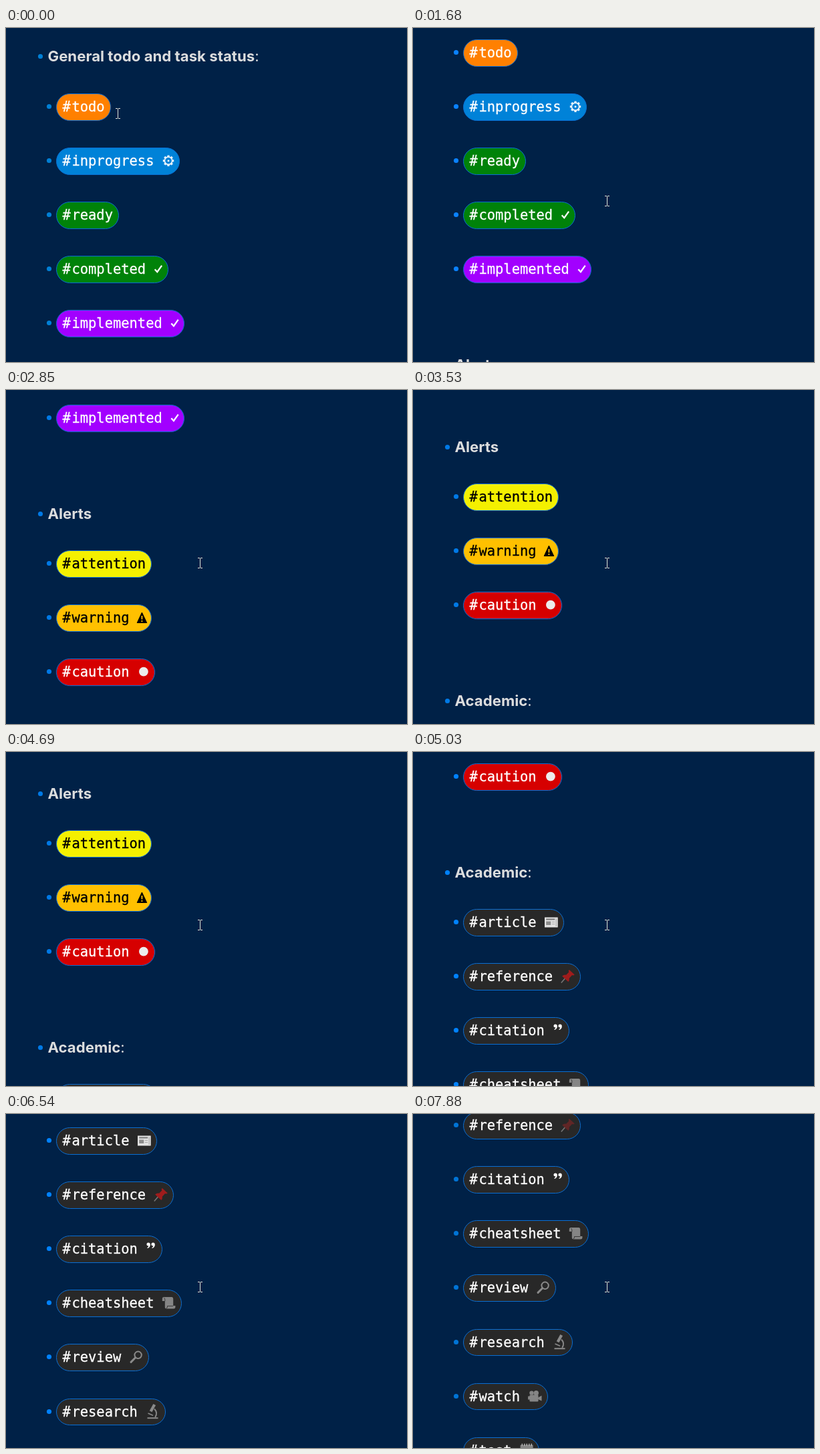
An HTML page that plays this animation: 600 by 500 pixels, repeating every 8 s.

```html
<!DOCTYPE html>
<html lang="en">
<head>
<meta charset="utf-8">
<title>Tag styles</title>
<style>
  html, body { margin: 0; width: 100%; height: 100%; overflow: hidden; background: #002147; }
  svg { display: block; width: 600px; height: 500px; }
  .head { font: 700 22.2px Inter, sans-serif; fill: #dcddde; }
  .head tspan { font-weight: 400; }
  .tag { font: 20.43px "DejaVu Sans Mono", monospace; stroke-width: .3px; }
</style>
</head>
<body>
<svg viewBox="0 0 600 500">
  <g id="page"></g>
  <path id="caret" d="M0 .5H3M4 .5H7M3.5 1V15M0 15.5H3M4 15.5H7" fill="none" stroke="#e6e2d6"/>
</svg>
<script>
const LOOP = 8000, CHAR = 12.3, LEFT = 85, PITCH = 81.1, PILL = 40.6;
const page = document.getElementById('page');
const caret = document.getElementById('caret');

const teeth = Array.from({ length: 8 }, (_, i) =>
  `<path d="M-1.5 -8.2H1.5L2 -5H-2Z" transform="rotate(${i * 45})"/>`).join('');

// Each icon: advance width and artwork, drawn from its left edge and the row's centre line.
const icons = {
  gear: [17, `<g transform="translate(10.4 -.3)" fill="#e8f2fa">${teeth}
    <circle r="5.6" fill="none" stroke="#e8f2fa" stroke-width="1.7"/><circle r="1.5"/></g>`],
  check: [12.3, `<path d="M2.4 .3L6 4.2L12.8 -5.4" fill="none" stroke="#fff" stroke-width="2.3"/>`],
  warn: [12.3, `<path d="M7.7 -8L15 7.5H.5Z" stroke="#000" stroke-linejoin="round"/>
    <path d="M7.7 -3V2.5M7.7 4V6" stroke="#ffc000" stroke-width="1.8"/>`],
  dot: [17, `<circle cx="10.2" cy="-.3" r="6.9" fill="#ececec"/>`],
  news: [20.5, `<path d="M1.3 -7.5H21V7.5H1.3Z" fill="#e2e2e2"/>
    <path d="M18.5 -5.5V6" stroke="#a0a0a0"/><path d="M3.5 -4.5H16.5" stroke="#777" stroke-width="2"/>
    <path d="M3.5 -1.5H10.5V4H3.5Z" fill="#8b8b8b"/>
    <path d="M12 -.5H16.5M12 2.5H16.5" stroke="#aaa"/>`],
  pin: [20.5, `<path d="M8 2L1.5 9.5" stroke="#777" stroke-width="1.6"/>
    <path id="pin" d="M13.5 -10L21.5 -2.5L19.5 -1.5L17.8 -2L13.6 2.4Q14 5.6 12 8L2.8 -.6Q5.5 -2.8 8.8 -2.3L13 -6.6L12.3 -8.4Z"/>`],
  quote: [15.6, [2.4, 9.4].map(x => `<path transform="translate(${x} -9.5)" fill="#fff"
    d="M2.4 0Q5.4 0 5.4 3.2Q5.4 7.2 1.4 8.6L.8 7.5Q2.8 6.5 3 5Q0 5 0 2.5Q0 0 2.4 0Z"/>`).join('')],
  scroll: [20.5, `<path d="M3.2 -9H15.2Q17.6 -9 17.6 -6V4H20.8V6Q20.8 8.5 18 8.5H8Q5.2 8.5 5.2 6V-3H1.2V-6.5Q1.2 -9 3.2 -9Z" fill="#858585"/>
    <path d="M4 -8Q5.4 -7 5.4 -3M8.5 4.5H17.6M9 4.5Q9 8 7 8" fill="none" stroke="#3c3c3c"/>`],
  lens: [20.5, `<g fill="none" stroke="#8a8a8a"><circle cx="14.2" cy="-3.2" r="5.2" stroke-width="2"/>
    <path d="M10.2 .8L3.6 7.4" stroke-width="3" stroke-linecap="round"/></g>`],
  scope: [20.5, `<g fill="none" stroke="#8a8a8a"><path d="M14.2 -11L8.6 -.8" stroke-width="4.2"/>
    <path d="M14 -4.5Q19.5 1 15.2 8" stroke-width="1.9"/>
    <path d="M3.5 9.2H19.5" stroke-width="2"/><path d="M4.5 2L12 5.2" stroke-width="1.6"/></g>`],
  camera: [20.5, `<g fill="#858585"><circle cx="6.4" cy="-5.4" r="3.2"/><circle cx="13.2" cy="-5.2" r="3.7"/>
    <rect x="3.4" y="-2.5" width="13" height="10" rx="1.2"/>
    <path d="M16 1.5L21.4 -1.5V6.5L16 4Z"/><path d="M1 -.5H4V4.5H1Z"/></g>`],
  diary: [20.5, `<rect x="1.8" y="-8.5" width="19" height="17" fill="#858585"/>
    <path d="M4.5 -10.5V-7M8 -10.5V-7M11.5 -10.5V-7M15 -10.5V-7M18.5 -10.5V-7" stroke="#b8b8b8" stroke-width="1.4"/>
    <path d="M3.5 -3H19M3.5 1H19M3.5 5H19" stroke="#444"/>`]
};

const GREEN = '#008209', DARK = '#282828';
const sections = [
  { y: 42, top: 98, title: 'General todo and task status', colon: ':', tags: [
    ['todo', '#ff8000'], ['inprogress', '#0082d8', 'gear'], ['ready', GREEN],
    ['completed', GREEN, 'check'], ['implemented', '#a200ff', 'check']] },
  { y: 585, top: 640, title: 'Alerts', colon: '', tags: [
    ['attention', '#f4f000', '', '#000'], ['warning', '#ffc000', 'warn', '#000'],
    ['caution', '#d60000', 'dot']] },
  { y: 965, top: 1020, title: 'Academic', colon: ':', tags: [
    ['article', DARK, 'news'], ['reference', DARK, 'pin'], ['citation', DARK, 'quote'],
    ['cheatsheet', DARK, 'scroll'], ['review', DARK, 'lens'], ['research', DARK, 'scope'],
    ['watch', DARK, 'camera'], ['test', DARK, 'diary']] }
];

const bullet = (x, y) => `<circle cx="${x}" cy="${y}" r="3.55" fill="currentColor"/>`;

// Pill edges snap to whole pixels.
function tag([name, fill, icon, ink = '#fff'], start) {
  const top = Math.round(start), bottom = Math.round(start + PILL), mid = top + 20;
  const end = (name.length + 2) * CHAR;
  const [advance, art] = icons[icon] || [-CHAR, ''];
  const width = Math.floor(20.5 + end + advance + 1e-6);
  return bullet(64.5, mid - .5) +
    `<rect x="75.5" y="${top + .5}" width="${width - 1}" height="${bottom - top - 1}" rx="20" fill="${fill}" stroke="#0a6ed2"/>` +
    `<text class="tag" x="${LEFT - .6}" y="${mid + 7}" fill="${ink}" stroke="${ink}">#<tspan dx="1.8">${name}</tspan></text>` +
    `<g transform="translate(${LEFT + end} ${mid})">${art}</g>`;
}

page.innerHTML = sections.map(s => bullet(51.5, s.y + .5) +
  `<text class="head" x="62.5" y="${s.y + 8}">${s.title}<tspan>${s.colon}</tspan></text>` +
  s.tags.map((t, i) => tag(t, s.top + i * PITCH)).join('')).join('');

// Holds each value until the next step.
function play(el, prop, steps, format = v => v) {
  const frames = steps.map(([t, ...v]) => ({ offset: t / LOOP, [prop]: format(...v), easing: 'step-end' }));
  frames.push({ ...frames[frames.length - 1], offset: 1 });
  const run = el.animate(frames, { duration: LOOP, iterations: Infinity });
  run.startTime = document.timeline.currentTime;
}

play(page, 'transform', [
  [0, 0], [1680, 81], [1850, 200], [2340, 282], [2510, 300], [2680, 353], [2850, 400],
  [3360, 447], [3530, 500], [4690, 523], [4860, 660], [5030, 785], [5190, 800],
  [5520, 832], [5710, 900], [6370, 947], [6540, 1000], [7540, 1047], [7710, 1100], [7880, 1104]
], y => `translate(0px, ${-y}px)`);

play(caret, 'transform', [
  [0, 164, 120], [170, 233, 163], [340, 264, 187], [510, 267, 190], [1010, 285, 221], [1180, 287, 251]
], (x, y) => `translate(${x}px, ${y}px)`);

play(page, 'color', [
  [0, '#0080d6'], [1680, '#0a82ff'], [2340, '#0079e6'], [4860, '#0082ff'], [7540, '#0074d6']
]);

play(document.getElementById('pin'), 'fill', [[0, '#a01c1c'], [7540, '#602626']]);
</script>
</body>
</html>
```
